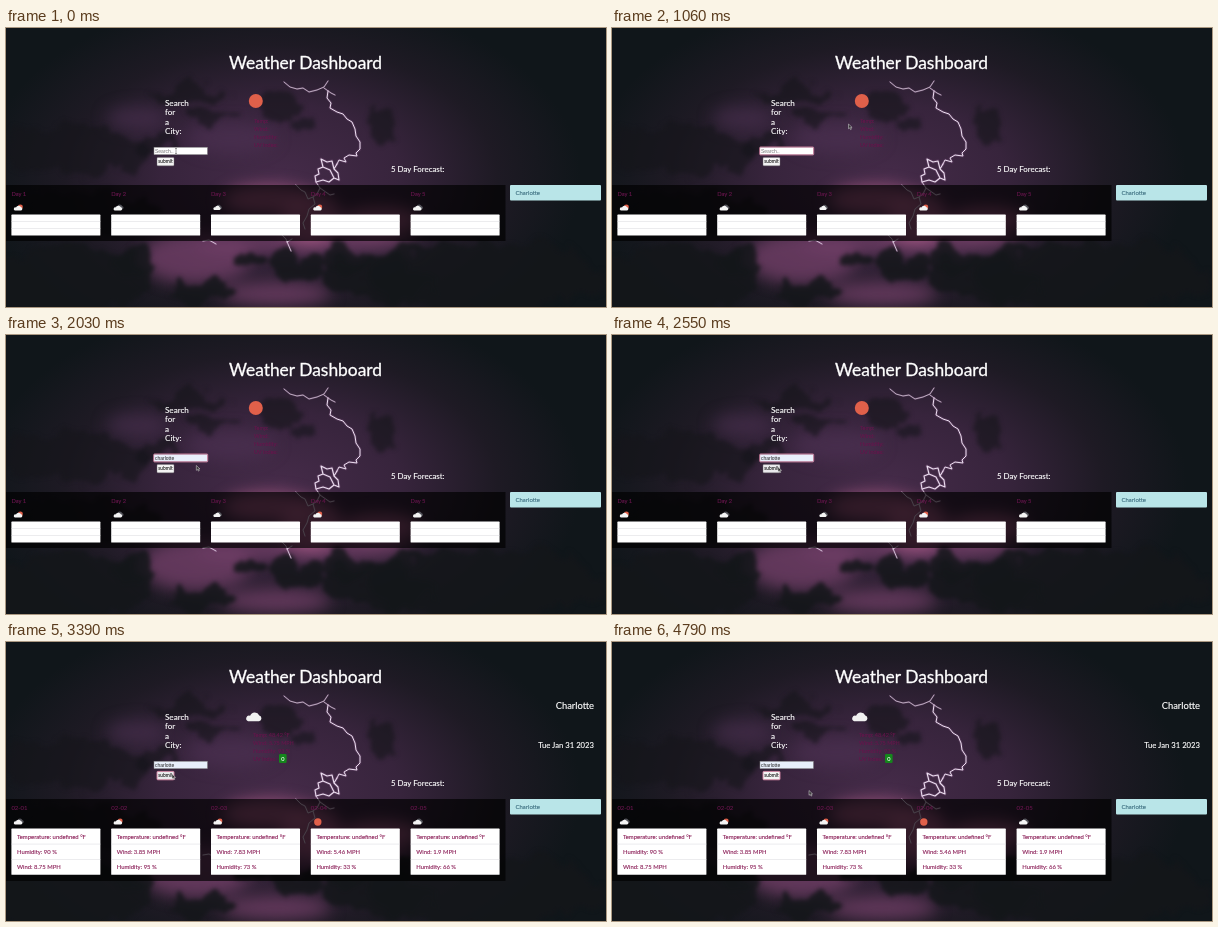
Animation of 600x279 px, one loop 4910 ms. Source, as an HTML page:

```html
<!DOCTYPE html>
<html lang="en">
<head>
<meta charset="utf-8">
<title>Weather Dashboard</title>
<style>
  html, body { margin: 0; width: 100%; height: 100%; overflow: hidden; background: #10161a; }
  svg { display: block; width: 100%; height: 100%; }
  text { font-family: Lato, "Open Sans", sans-serif; white-space: pre; }
  .ui { font-family: "Liberation Sans", Arial, sans-serif; }
</style>
</head>
<body>
<svg id="stage" viewBox="0 0 600 279">
  <defs>
    <radialGradient id="sky" gradientUnits="userSpaceOnUse" cx="0" cy="0" r="1"
      gradientTransform="translate(275 150) scale(300 185)">
      <stop offset="0" stop-color="#452b49"/>
      <stop offset=".4" stop-color="#37243c"/>
      <stop offset=".72" stop-color="#1e1a24"/>
      <stop offset="1" stop-color="#10161a"/>
    </radialGradient>
    <filter id="soft" x="-50%" y="-50%" width="200%" height="200%" color-interpolation-filters="sRGB">
      <feGaussianBlur stdDeviation="8"/>
    </filter>
    <filter id="ragged" filterUnits="userSpaceOnUse" x="-40" y="-40" width="680" height="360"
      color-interpolation-filters="sRGB">
      <feTurbulence type="fractalNoise" baseFrequency=".035" numOctaves="4" seed="7" result="noise"/>
      <feDisplacementMap in="SourceGraphic" in2="noise" scale="34" xChannelSelector="R" yChannelSelector="G"/>
      <feGaussianBlur stdDeviation="2.2"/>
    </filter>
    <path id="cloud" d="M2.6 6.6H13.6A3 3 0 0 0 13.8 .8A5 5 0 0 0 4.6 1.2A2.8 2.8 0 0 0 2.6 6.6Z"/>
  </defs>
  <rect width="600" height="279" fill="url(#sky)"/>
  <g id="glow" filter="url(#soft)"></g>
  <g id="dark" filter="url(#ragged)"></g>
  <g id="bolt" fill="none" stroke-linejoin="round" stroke-linecap="round"></g>
  <g id="page"></g>
  <g id="before"></g>
  <g id="current"></g>
  <g id="forecast"></g>
  <g id="form"></g>
  <path id="arrow" d="M0 0V4.8L1.2 3.8L2 5.6L2.9 5.2L2.1 3.4H3.6Z" fill="#333" stroke="#ddd" stroke-width=".5"/>
  <path id="beam" d="M-1 -2.5H1M0 -2.5V2.5M-1 2.5H1" fill="none" stroke="#444" stroke-width=".5"/>
</svg>
<script>
const LOOP = 4910;
const CLICK_INPUT = 110, PREVIEW = 1480, ACCEPT = 1740, HOVER = 2380, SUBMIT = 2780;
const CURRENT = 3230, FORECAST = 3300;
const WINE = '#8a1d56', FAINT = '#66164c', SUN = '#e0604a';
const $ = id => document.getElementById(id);

function add(parent, tag, attrs, content) {
  const el = document.createElementNS('http://www.w3.org/2000/svg', tag);
  for (const k in attrs) el.setAttribute(k, attrs[k]);
  if (content) el.textContent = content;
  (typeof parent === 'string' ? $(parent) : parent).appendChild(el);
  return el;
}
const label = (parent, x, y, size, fill, str, more) => add(parent, 'text',
  { x, y, 'font-size': size, fill, stroke: fill, 'stroke-width': size * .018, ...more }, str);
const box = (parent, x, y, width, height, fill, more) =>
  add(parent, 'rect', { x, y, width, height, fill, ...more });
const show = (el, on) => el.setAttribute('visibility', on ? 'visible' : 'hidden');

// Sky
const blob = (parent, fill, opacity) => ([cx, cy, rx, ry]) =>
  add(parent, 'ellipse', { cx, cy, rx, ry, fill, opacity });
[[190, 230, 55, 26], [270, 266, 55, 12], [300, 214, 110, 12]].forEach(blob('glow', '#74406a', .75));
[[262, 172, 46, 14], [375, 192, 40, 13], [305, 190, 30, 25]].forEach(blob('glow', '#b8628f', .75));
[[130, 90, 30, 12], [225, 110, 45, 16]].forEach(blob('glow', '#523459', .5));
[[70, 122, 75, 24], [185, 64, 36, 8], [205, 88, 26, 9], [275, 80, 22, 10], [292, 98, 15, 8],
 [150, 118, 24, 8], [375, 98, 16, 18], [80, 185, 75, 22]].forEach(blob('dark', '#15151b', .62));
[[295, 238, 30, 15], [375, 252, 55, 24], [480, 250, 120, 36], [195, 264, 32, 12],
 [60, 255, 85, 36], [345, 230, 22, 10], [130, 232, 20, 10], [245, 234, 18, 8]].forEach(blob('dark', '#14171a', .86));

// Lightning
const strokes = [
  ['M278 54L284 59L291 61L297 60L303 64L311 62L318 59L322 53M318 60L325 65L329 67', .7],
  ['M322 63L321 70L325 75L324 80L331 84L337 86L341 91L346 94L349 101L350 108L354 114L354 121L350 125L351 128L343 127L338 130L340 134L333 132L331 136', 1],
  ['M331 136L328 141L326 133L321 134L315 131L317 139L312 141L313 146L309 148L310 154L317 152L323 154L328 150L333 152L332 145L328 141M317 139L324 142L328 150', 1.1],
  ['M310 154L314 160L311 166L307 169L309 176L303 181L301 188L297 195L299 201M290 157L295 162L299 164L302 171L307 169M314 160L324 167L328 166', .8],
  ['M276 207L280 211L282 216L285 223M197 213L203 212L210 216M281 214L286 211', .8]
];
for (const [d, w] of strokes) {
  add('bolt', 'path', { d, stroke: '#a873a8', 'stroke-width': w * 2.6, opacity: .25 });
  add('bolt', 'path', { d, stroke: '#ecdff0', 'stroke-width': w });
}

// Fixed page parts
label('page', 299.5, 41.2, 17.4, '#fff', 'Weather Dashboard', { 'text-anchor': 'middle' });
['Search', 'for', 'a', 'City:'].forEach((s, i) => label('page', 159, 77.5 + i * 9.6, 8.1, '#fff', s));
label('page', 385, 144, 7.9, '#fff', '5 Day Forecast:');
const panel = box('page', 0, 157, 499.5, 56, '#000', { opacity: .68 });
box('page', 504, 157, 91, 15.5, '#b9e5e8', { rx: 1 });
label('page', 509.5, 167, 6, '#3d6f80', 'Charlotte');

// Weather icons
function cloud(parent, x, y, scale, fill, sunny) {
  const g = add(parent, 'g', { transform: `translate(${x} ${y}) scale(${scale})` });
  if (sunny) add(g, 'circle', { cx: 12.5, cy: .5, r: 4.4, fill: SUN });
  else if (scale < 1) add(g, 'use', { href: '#cloud', x: 2.5, y: -2, fill: '#53535a' });
  add(g, 'use', { href: '#cloud', fill });
}
const sun = (parent, cx, cy, r) => add(parent, 'circle', { cx, cy, r, fill: SUN });
const left = i => 5.4 + i * 99.8;

// Empty state
const idleNow = add('before', 'g', {});
sun(idleNow, 249.8, 73, 7);
['Temp:', 'Wind:', 'Humidity:', 'UV Index:'].forEach((s, i) =>
  label(idleNow, 248, 94.5 + i * 8, 5.5, FAINT, s));
const idleDays = add('before', 'g', {});

// Loaded state
cloud('current', 239.5, 72.6, 1, '#f1f1f1');
['Temp: 48.42 °F', 'Wind: 5.75 MPH', 'Humidity: 93 %', 'UV Index:'].forEach((s, i) =>
  label('current', 247, 94.5 + i * 8, 5.5, FAINT, s));
box('current', 273, 112, 7.6, 9, '#15861c', { rx: 1.2 });
label('current', 276.8, 118.5, 5.5, '#fff', '0', { 'text-anchor': 'middle' });
label('current', 588, 67, 9.4, '#fff', 'Charlotte', { 'text-anchor': 'end' });
label('current', 588, 105.5, 7.7, '#fff', 'Tue Jan 31 2023', { 'text-anchor': 'end' });

function table(parent, x, rowH, rows) {
  box(parent, x, 186.6, 89, rowH * 3, '#fff', { rx: .6 });
  rows.forEach((s, i) => {
    if (i) box(parent, x, 186.4 + i * rowH, 89, .5, '#d8d8dc');
    label(parent, x + 5.6, 196.6 + i * rowH, 5.9, WINE, s);
  });
}
const wind = [8.75, 3.85, 7.83, 5.46, 1.9], humid = [90, 95, 73, 33, 66];
for (let i = 0; i < 5; i++) {
  const x = left(i);
  label(idleDays, x, 168, 5.8, FAINT, 'Day ' + (i + 1));
  cloud(idleDays, x + 2, 178.8, i === 2 ? .48 : .56, '#f4f4f4', i === 0 || i === 3);
  table(idleDays, x, 7, ['', '', '']);

  label('forecast', x, 168, 6, FAINT, '02-0' + (i + 1));
  if (i === 3) sun('forecast', x + 7, 180, 3.7);
  else cloud('forecast', x + 2, 178.8, .56, '#f4f4f4', i === 1 || i === 2);
  const rows = [`Wind: ${wind[i]} MPH`, `Humidity: ${humid[i]} %`];
  if (i === 0) rows.reverse();
  table('forecast', x, 15.4, ['Temperature: undefined °F', ...rows]);
}

// Search form
const field = box('form', 148, 119.3, 53.4, 7.3, '#fff', { 'stroke-width': .5 });
const ring = box('form', 147.7, 119, 54, 7.9, 'none', { rx: .8, stroke: '#d98aa6', 'stroke-width': .9 });
const entry = label('form', 149, 124.6, 4.8, '#777', '', { class: 'ui', stroke: 'none' });
const button = box('form', 151, 129.4, 17, 8.4, '#f3f3f3', { rx: .8 });
label('form', 159.5, 135.2, 4.9, '#222', 'submit', { 'text-anchor': 'middle' });

// Pointer: [time, x, y]
const track = [
  [0, 170, 123], [130, 170, 123], [310, 236.5, 96], [1130, 236.5, 96], [1500, 198.5, 130],
  [1850, 198.5, 130], [2400, 166, 132], [3900, 166, 132], [4650, 197, 148.5], [LOOP, 197, 148.5]
];
function pointer(t) {
  const i = track.findIndex(p => p[0] > t);
  const [t0, x0, y0] = track[i - 1], [t1, x1, y1] = track[i];
  const u = (t - t0) / (t1 - t0), k = u * u * (3 - 2 * u);
  return [x0 + (x1 - x0) * k, y0 + (y1 - y0) * k];
}

function draw(t) {
  const loaded = t >= FORECAST, now = t >= CURRENT;
  show(idleNow, !now);
  show($('current'), now);
  show(idleDays, !loaded);
  show($('forecast'), loaded);
  panel.setAttribute('height', loaded ? 82 : 56);

  const filled = t >= ACCEPT, preview = t >= PREVIEW && !filled;
  const focused = t >= CLICK_INPUT && t < SUBMIT;
  entry.textContent = filled || preview ? 'charlotte' : 'Search..';
  entry.setAttribute('fill', filled || preview ? '#222' : '#777');
  entry.setAttribute('font-size', preview ? 4 : 5);
  field.setAttribute('fill', filled || preview ? '#e8effb' : '#fff');
  field.setAttribute('stroke', focused ? 'none' : '#888');
  show(ring, focused);
  button.setAttribute('fill', t >= HOVER && t < 4050 ? '#e9e9ec' : '#f3f3f3');
  button.setAttribute('stroke', t >= SUBMIT ? '#d98aa6' : '#777');
  button.setAttribute('stroke-width', t >= SUBMIT ? .9 : .4);

  const [x, y] = pointer(t);
  const inField = x > 148 && x < 201.4 && y > 119 && y < 126.6;
  for (const id of ['arrow', 'beam']) $(id).setAttribute('transform', `translate(${x} ${y})`);
  show($('arrow'), !inField);
  show($('beam'), inField);
}

let start;
function tick(now) {
  start ??= now;
  draw((now - start) % LOOP);
  requestAnimationFrame(tick);
}
draw(0);
requestAnimationFrame(tick);
</script>
</body>
</html>
```
